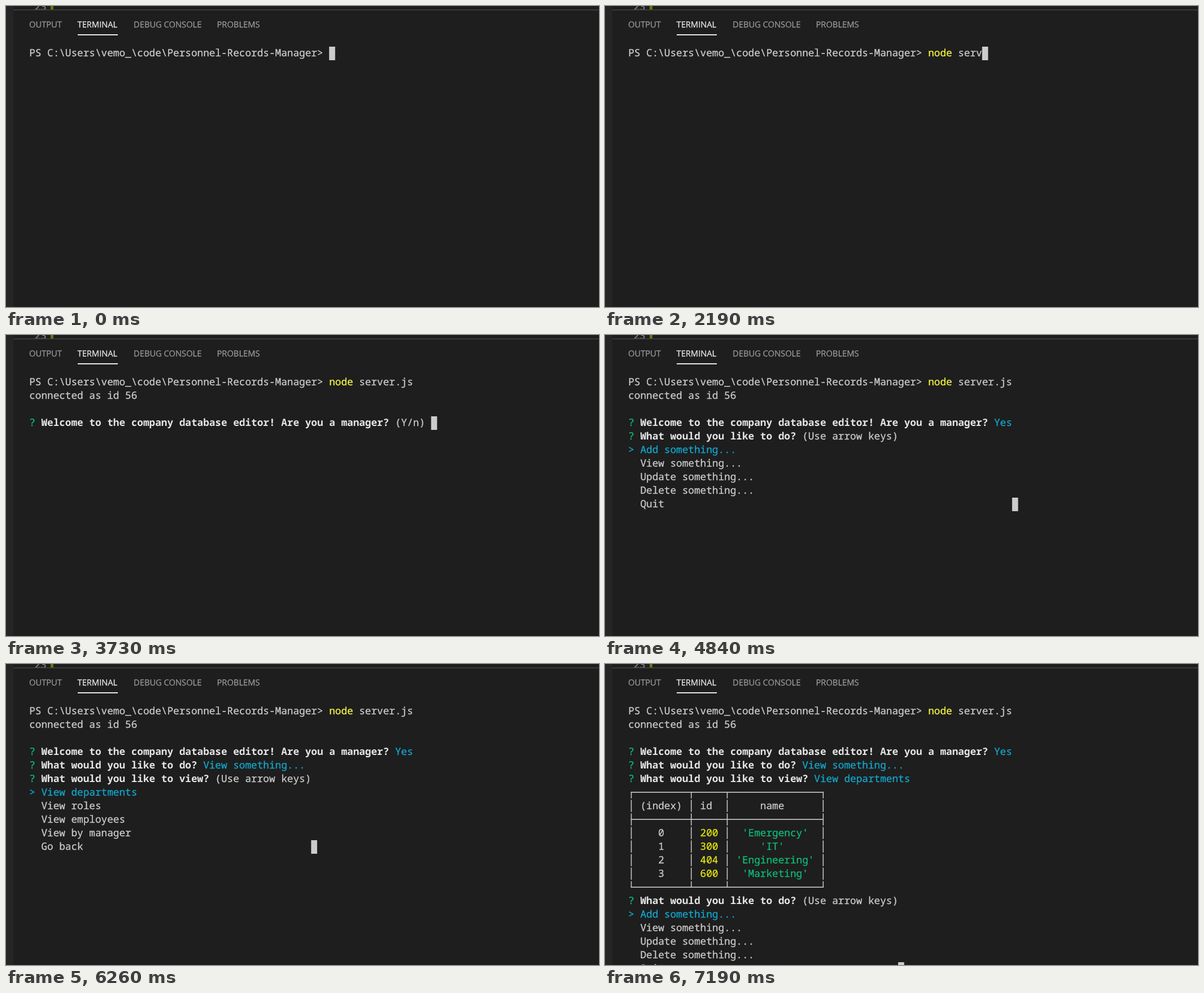
An HTML page with a canvas that plays this animation: 1050x533 px, repeating every 8000 ms.

```html
<!DOCTYPE html>
<html lang="en">
<head>
<meta charset="utf-8">
<title>Terminal session</title>
<style>
  html, body { margin: 0; width: 100%; height: 100%; overflow: hidden; background: #1e1e1e; }
  canvas { display: block; }
</style>
</head>
<body>
<canvas id="stage" width="1050" height="533"></canvas>
<script>
const g = document.getElementById('stage').getContext('2d');
const LOOP = 8000, LEFT = 41.15, TOP = 72, CELL = 10.62, ROW = 24;
const MONO = '17.7px "Noto Sans Mono", "DejaVu Sans Mono", monospace';
const UI = '14.7px "Open Sans", "Noto Sans", sans-serif';
const FG = '#cccccc', WHITE = '#e5e5e5', GREEN = '#0dbc79', CYAN = '#11a8cd',
      YELLOW = '#e5e510', BRIGHT = '#f5f543';

const PROMPT = 'PS C:\\Users\\vemo_\\code\\Personnel-Records-Manager> ';
const COMMAND = 'node server.js';
const KEYS = [90, 170, 550, 710, 950, 1190, 1880, 1960, 2190, 2350, 2350, 2500, 2660, 2760];
const HELLO = 'Welcome to the company database editor! Are you a manager?';
const TODO = 'What would you like to do?';
const VIEW = 'What would you like to view?';
const HINT = '(Use arrow keys)';
const ACTIONS = ['Add something...', 'View something...', 'Update something...', 'Delete something...', 'Quit'];
const VIEWS = ['View departments', 'View roles', 'View employees', 'View by manager', 'Go back'];
const DEPARTMENTS = [[200, 'Emergency'], [300, 'IT'], [404, 'Engineering'], [600, 'Marketing']];

const colX = col => LEFT + col * CELL;
const rowY = row => TOP + row * ROW;

function box(x, y, w, h, color) {
  g.fillStyle = color;
  g.fillRect(x, y, w, h);
}

// A hairline outline gives the glyphs a slightly heavier weight.
function write(text, x, y, color, outline = 0.3) {
  g.fillStyle = g.strokeStyle = color;
  g.lineWidth = outline;
  g.fillText(text, x, y);
  if (outline) g.strokeText(text, x, y);
}

// Writes text on the character grid.
function put(row, col, text, color = FG, bold = false) {
  g.font = (bold ? 'bold ' : '') + MONO;
  [...text].forEach((ch, i) => write(ch, colX(col + i), rowY(row) + 17, color, bold ? 0 : 0.3));
}

function cursor(row, col) {
  box(colX(col), rowY(row), CELL, ROW, FG);
}

function ask(row, question, reply, color = CYAN) {
  put(row, 0, '?', GREEN);
  put(row, 2, question, WHITE, true);
  put(row, question.length + 3, reply, color);
}

function menu(row, items, chosen) {
  items.forEach((item, i) =>
    put(row + i, 0, (i === chosen ? '> ' : '  ') + item, i === chosen ? CYAN : FG));
}

function table(row) {
  const cols = [0, 10, 16, 32], last = 7;
  for (let r = 0; r <= last; r++) {
    const from = r === 0 ? 10.5 : 0.5, to = r === last ? 12 : 22;
    for (const c of cols) box(colX(c + 0.5) - 0.7, rowY(row + r) + from, 1.5, to - from, FG);
  }
  for (const r of [0, 2, last])
    box(colX(0.5) - 0.7, rowY(row + r) + 10.4, 32 * CELL + 1.5, 1.6, FG);
  put(row + 1, 2, '(index)');
  put(row + 1, 12, 'id');
  put(row + 1, 22, 'name');
  DEPARTMENTS.forEach(([id, name], i) => {
    const quoted = `'${name}'`;
    put(row + 3 + i, 5, String(i));
    put(row + 3 + i, 12, String(id), YELLOW);
    put(row + 3 + i, 17 + Math.floor((15 - quoted.length) / 2), quoted, GREEN);
  });
}

function panel() {
  box(0, 0, 1050, 533, '#1e1e1e');
  box(0, 0, 13, 533, '#252526');
  g.font = MONO;
  write('23', 50.5, 6.5, '#858585');
  box(13, 6, 1037, 10, '#1e1e1e');
  box(13, 6, 1037, 1.6, '#414141');
  box(79, 0, 5, 6, '#587c0c');
  g.font = UI;
  [['OUTPUT', 41], ['TERMINAL', 126.5], ['DEBUG CONSOLE', 226], ['PROBLEMS', 373.5]].forEach(([name, x], i) =>
    write(name, x, 38, i === 1 ? '#e7e7e7' : '#979797'));
  box(127, 50, 71, 2, '#e7e7e7');
}

function draw(t) {
  panel();
  const typed = KEYS.filter(k => t >= k).length;
  put(0, 0, PROMPT);
  put(0, 50, COMMAND.slice(0, Math.min(typed, 4)), BRIGHT);
  put(0, 54, COMMAND.slice(4, Math.max(typed, 4)));
  if (t < 3350) return cursor(0, 50 + typed);
  if (t < 3730) return cursor(1, 0);

  put(1, 0, 'connected as id 56');
  if (t < 4840) {
    const reply = t < 4610 ? '(Y/n) ' : '(Y/n) y';
    ask(3, HELLO, reply, FG);
    return cursor(3, 61 + reply.length);
  }

  ask(3, HELLO, 'Yes');
  if (t < 6260) {
    const moved = t >= 6010;
    ask(4, TODO, moved ? '' : HINT, FG);
    menu(5, ACTIONS, moved ? 1 : 0);
    return cursor(9, moved ? 29 : 64);
  }

  ask(4, TODO, ACTIONS[1]);
  if (t < 7030) {
    ask(5, VIEW, HINT, FG);
    menu(6, VIEWS, 0);
    return cursor(10, 47);
  }

  ask(5, VIEW, VIEWS[0]);
  if (t < 7100) return cursor(6, 0);
  table(6);
  if (t < 7190) return cursor(14, 0);
  ask(14, TODO, HINT, FG);
  menu(15, ACTIONS, 0);
  cursor(19, 45);
}

g.textRendering = 'geometricPrecision';
g.lineJoin = 'round';
const start = performance.now();
function tick() {
  draw((performance.now() - start) % LOOP);
  requestAnimationFrame(tick);
}
tick();
</script>
</body>
</html>
```
